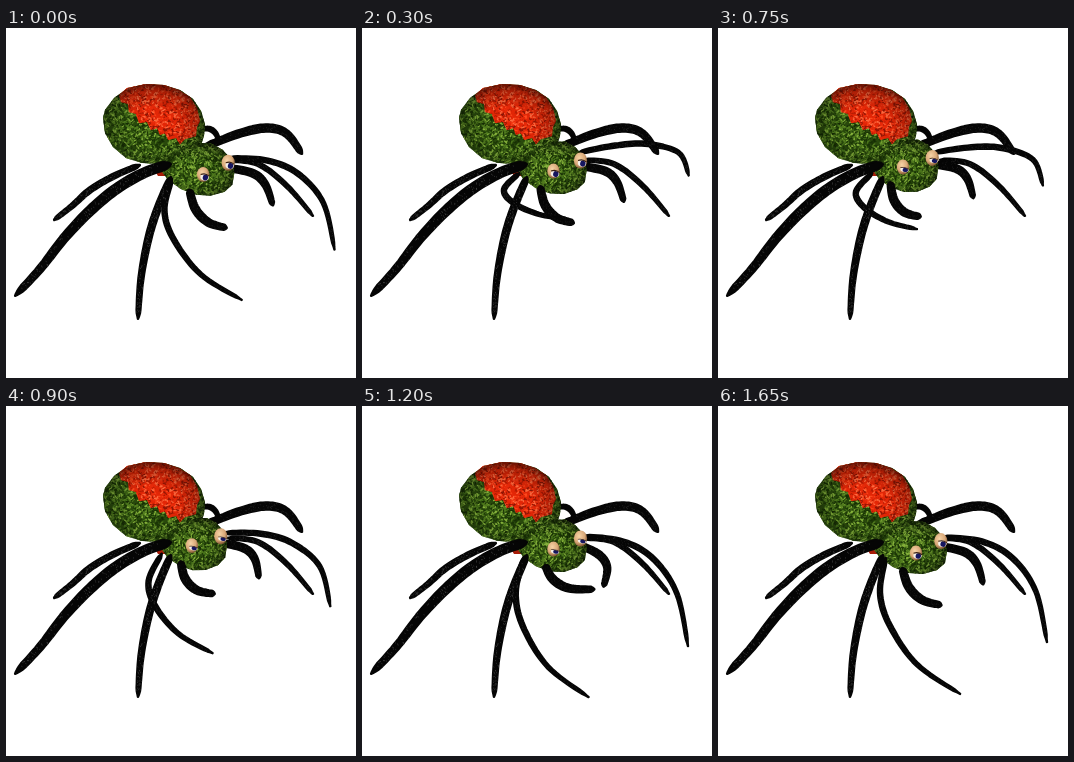
Recreate the animation shown at these times as an HTML page. Size 350 px wide and 350 px high, loop 1800 ms.

```html
<!DOCTYPE html>
<html lang="en">
<head>
<meta charset="utf-8">
<title>Spider</title>
<style>
html, body { margin: 0; width: 100%; height: 100%; overflow: hidden; background: #fff; }
svg { display: block; width: 100vw; height: 100vh; }
</style>
</head>
<body>
<svg viewBox="0 0 350 350">
  <defs>
    <radialGradient id="shade" cx=".48" cy=".54" r=".6">
      <stop offset=".4" stop-color="#000" stop-opacity="0"/>
      <stop offset=".75" stop-color="#000" stop-opacity=".25"/>
      <stop offset="1" stop-color="#000" stop-opacity=".78"/>
    </radialGradient>
    <radialGradient id="lid" cx=".4" cy=".35" r=".7">
      <stop offset="0" stop-color="#f6d3a6"/>
      <stop offset=".6" stop-color="#d9a878"/>
      <stop offset="1" stop-color="#6d4526"/>
    </radialGradient>
    <clipPath id="bellyClip"><path id="belly" d="M97 90L99 82L108 70L122 60L140 56L158 57L174 62L187 71L195 83L199 96L198 108L194 120L170 131L155 136L136 135L120 130L107 119L99 105Z"/></clipPath>
    <clipPath id="redClip"><path id="red" d="M121 60L113 67L115 74L122 76L123 84L130 86L133 95L141 94L145 102L151 100L154 107L159 105L162 112L170 110L174 116L179 111L190 108L191 99L194 93L191 80L184 69L173 62L158 57L140 56Z"/></clipPath>
    <clipPath id="skullClip"><path id="skull" d="M152 138L160 128L176 121L194 115L206 116L217 122L225 131L229 145L227 157L219 164L205 168L190 167L175 161L162 152Z"/></clipPath>
  </defs>
  <g id="back"></g>
  <g id="abdomen"></g>
  <g id="mid"></g>
  <g id="head"></g>
  <g id="front"></g>
  <g id="eyes"></g>
</svg>
<script>
const STEP = 150, COUNT = 12;
const $ = id => document.getElementById(id);
const mix = (a, b, u) => a + (b - a) * u;
const wave = (t, peak) => Math.cos(2 * Math.PI * (t - peak) / COUNT);
const pulse = (t, peak, power) => ((1 + wave(t, peak)) / 2) ** power;

function add(parent, tag, attrs) {
  const el = document.createElementNS('http://www.w3.org/2000/svg', tag);
  for (const k in attrs) el.setAttribute(k, attrs[k]);
  parent.appendChild(el);
  return el;
}

function random(seed) {
  return () => {
    seed = (seed * 1664525 + 1013904223) >>> 0;
    return seed / 4294967296;
  };
}

// Smooth curve through the points, as samples [x, y, normal x, normal y]
function centreLine(p) {
  const n = p.length / 2, steps = 10 * (n - 1);
  const at = (i, k) => p[2 * Math.max(0, Math.min(n - 1, i)) + k];
  const spots = Array.from({ length: steps + 1 }, (_, s) => {
    const i = Math.min(n - 2, Math.floor(s / 10)), u = s / 10 - i;
    return [0, 1].map(k => {
      const a = at(i, k), b = at(i + 1, k);
      const ta = (b - at(i - 1, k)) / 2, tb = (at(i + 2, k) - a) / 2;
      return a + u * (ta + u * (3 * (b - a) - 2 * ta - tb + u * (2 * (a - b) + ta + tb)));
    });
  });
  return spots.map(([x, y], s) => {
    const a = spots[Math.max(0, s - 1)], b = spots[Math.min(steps, s + 1)];
    const dx = b[0] - a[0], dy = b[1] - a[1], len = Math.hypot(dx, dy) || 1;
    return [x, y, -dy / len, dx / len];
  });
}

// A tapered limb with rounded ends and faint glints; returns its redraw function
function makeLeg(layer, root, tip, glint) {
  const group = $(layer);
  const body = add(group, 'path', { fill: '#050505', stroke: '#050505', 'stroke-width': 2, 'stroke-linejoin': 'round' });
  const dots = add(group, 'path', { fill: 'none', stroke: '#b4b4b4', 'stroke-width': .8, 'stroke-opacity': glint });
  const width = u => mix(root, tip, u) * (.88 + .24 * Math.sin(Math.PI * u)) *
    Math.min(1, Math.sqrt(Math.min(u, 1 - u) / .06));
  return points => {
    const line = centreLine(points), last = line.length - 1;
    const side = dir => line.map(([x, y, nx, ny], s) => {
      const h = dir * Math.max(.2, width(s / last) / 2 - 1);
      return (x + nx * h).toFixed(1) + ' ' + (y + ny * h).toFixed(1);
    });
    body.setAttribute('d', 'M' + side(1).concat(side(-1).reverse()).join('L') + 'Z');
    const rnd = random(77);
    let d = '';
    for (let k = 0; k < 130; k++) {
      const u = .1 + .85 * rnd(), [x, y, nx, ny] = line[Math.round(u * last)];
      const h = (rnd() - .5) * (width(u) - 1.5), slide = (rnd() - .5) * 7;
      d += `M${(x + nx * h + ny * slide).toFixed(1)} ${(y + ny * h - nx * slide).toFixed(1)}l.8 .4`;
    }
    dots.setAttribute('d', d);
  };
}

// A shape covered in short curly dabs of several colours
function paint(layer, shape, base, colours, density) {
  const group = $(layer), box = $(shape).getBBox(), rnd = random(density * 100);
  add(group, 'use', { href: '#' + shape, fill: base });
  const skin = add(group, 'g', { 'clip-path': `url(#${shape}Clip)`, fill: 'none', 'stroke-linecap': 'round' });
  const jit = () => ((rnd() - .5) * 4.6).toFixed(1);
  for (const stroke of colours) {
    let d = '';
    for (let k = box.width * box.height * density; k > 0; k--) {
      const x = box.x + rnd() * box.width, y = box.y + rnd() * box.height;
      d += `M${x.toFixed(1)} ${y.toFixed(1)}q${jit()} ${jit()} ${jit()} ${jit()}`;
    }
    add(skin, 'path', { d, stroke, 'stroke-width': 1.1 });
  }
}

function makeEye(rx, ry) {
  const eye = add($('eyes'), 'g', {});
  add(eye, 'ellipse', { rx, ry, fill: 'url(#lid)' });
  const gap = add(eye, 'g', {});
  add(gap, 'ellipse', { rx: 4.2, ry: 3.5, fill: '#f4efe9' });
  add(gap, 'ellipse', { cx: .9, cy: .3, rx: 2.7, ry: 3, fill: '#16165f' });
  add(gap, 'path', { d: 'M-4.4 -1.6Q0 -4.6 4.2 -1.8', fill: 'none', stroke: '#3b2010', 'stroke-width': 1.1 });
  return (x, y, open) => {
    eye.setAttribute('transform', `translate(${x} ${y})`);
    gap.setAttribute('transform', `translate(1.5 2.6) rotate(12) scale(1 ${open})`);
  };
}

// Resting legs behind the body
makeLeg('back', 7, 6, .25)([134,137, 108,148, 84,162, 66,178, 48,192]);
makeLeg('back', 6, 5, 0)([196,101, 204,101, 210,106, 214,116]);
makeLeg('back', 9, 8, .15)([196,120, 235,105, 262,100, 281,106, 296,126]);
makeLeg('back', 6, 5, .15)([222,132, 252,136, 281,158, 307,188]);

const GREENS = ['#142a04', '#47741a', '#1a3405', '#84b03a', '#527c1e'];
const REDS = ['#b51c04', '#ff4a1e', '#8f1504', '#ff6b40', '#e82a0a'];
paint('abdomen', 'belly', '#29490c', GREENS, .06);
paint('abdomen', 'red', '#e22606', REDS, .055);
add($('abdomen'), 'use', { href: '#belly', fill: 'url(#shade)' });
add($('abdomen'), 'path', { d: 'M146 138L158 137L160 148L152 148Z', fill: '#a81c08' });
paint('head', 'skull', '#29490c', GREENS, .065);
add($('head'), 'use', { href: '#skull', fill: 'url(#shade)' });

// Each limb goes from low to high and back; swing is the sway of its root and tip
const step = t => pulse(t, 3.4, 2.1);
const curl = t => pulse(t, 8.3, 4);
const limbs = [
  { draw: makeLeg('mid', 6.5, 5, .15), lift: step, swing: [2, 1, 3, -3],
    low: [222,130, 262,136, 292,154, 315,189, 326,242],
    high: [214,123, 246,112, 280,103, 317,103, 327,116] },
  { draw: makeLeg('mid', 9, 7, .08), lift: curl, swing: [4, 2, 6, 4],
    low: [218,138, 243,143, 255,154, 262,174],
    high: [218,139, 237,149, 245,162, 241,181] },
  { draw: makeLeg('front', 6.5, 5, .12), lift: step, swing: [6, 1, 16, -2],
    low: [162,151, 154,187, 161,221, 186,262, 227,293],
    high: [156,143, 138,153, 149,160, 174,161, 200,157] },
  { draw: makeLeg('front', 9, 8, .08), lift: curl, swing: [6, 4, 10, 6],
    low: [178,158, 183,177, 195,190, 212,195],
    high: [183,159, 191,173, 207,182, 233,183] }
];

// Resting legs in front
makeLeg('front', 8.5, 6.5, .35)([165,149, 153,177, 143,208, 135,250, 132,291]);
makeLeg('front', 11.5, 8.5, .38)([165,136, 140,144, 113,159, 87,180, 60,208, 34,241, 9,268]);

const leftEye = makeEye(6.2, 7.4), rightEye = makeEye(6.6, 8);

function moveLimb({ draw, lift, swing, low, high }, t, sway) {
  const up = lift(t);
  draw(low.map((v, i) => {
    const along = (i >> 1) / (low.length / 2 - 1), axis = i % 2;
    return mix(v, high[i], up) + sway * mix(swing[axis], swing[axis + 2], along) * (1 - up * .6);
  }));
}

function draw(t) {
  const sway = wave(t, 11), open = .8 + .24 * wave(t, 1);
  for (const limb of limbs) moveLimb(limb, t, sway);
  leftEye(191.5 + 6.5 * sway, 143 + 4 * sway, open);
  rightEye(218.5 + 4.3 * sway, 132.5 + 2.6 * sway, open);
  // The head turns about its joint with the belly at x = 158
  const dx = .06 * (sway - 1), dy = .045 * (sway - 1);
  $('head').setAttribute('transform',
    `matrix(${1 + dx} ${dy} 0 1 ${-158 * dx} ${-158 * dy})`);
}

let shown = -1;
const start = performance.now();
function tick() {
  const now = Math.floor((performance.now() - start) / STEP) % COUNT;
  if (now !== shown) draw(shown = now);
  requestAnimationFrame(tick);
}
tick();
</script>
</body>
</html>
```
